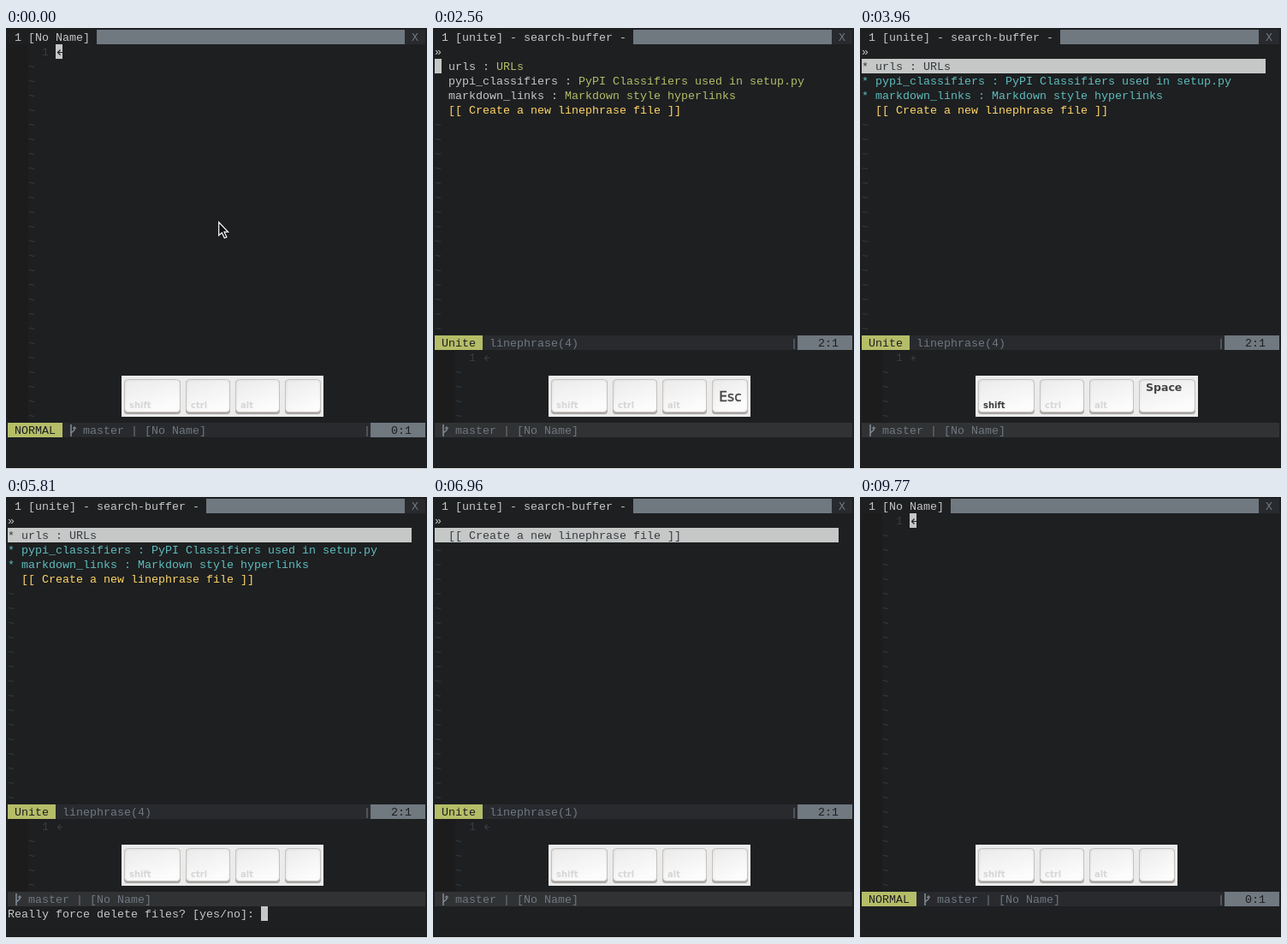
Recreate the animation shown at these times as an HTML page. Size 492 px wide and 515 px high, loop 9790 ms.

```html
<!DOCTYPE html>
<html lang="en">
<head>
<meta charset="utf-8">
<title>Editor session</title>
<style>
html, body { margin: 0; width: 100%; height: 100%; overflow: hidden; background: #1d1f21; }
svg { display: block; width: 492px; height: 515px; }
text { white-space: pre; }
.mono { font: 13.333px "Liberation Mono", monospace; }
.cap { font: bold 10px "DejaVu Sans", sans-serif; }
.key { font: bold 16px "DejaVu Sans", sans-serif; text-anchor: middle; }
.esc { font: 15.5px "DejaVu Sans", sans-serif; text-anchor: middle; stroke: #444; stroke-width: .35px; }
.wide { font: bold 12.5px "DejaVu Sans", sans-serif; }
</style>
</head>
<body>
<svg viewBox="0 0 492 515">
  <defs>
    <linearGradient id="face" x1="0" y1="0" x2="0.5" y2="1">
      <stop offset="0" stop-color="#e3e3e3"/>
      <stop offset="1" stop-color="#fbfbfb"/>
    </linearGradient>
  </defs>
  <g id="scene"></g>
</svg>
<script>
const LOOP = 9790, CW = 8, RH = 17;
const C = {
  bg: '#1d1f21', fg: '#c5c8c6', dim: '#373b41', gray: '#707880', bar: '#282a2e',
  green: '#b5bd68', blue: '#81a2be', cyan: '#5fbcbc', yellow: '#ffd566',
  sign: '#1c1c1c', idle: '#303234'
};
const ITEMS = [
  ['urls', 'URLs'],
  ['pypi_classifiers', 'PyPI Classifiers used in setup.py'],
  ['markdown_links', 'Markdown style hyperlinks']
];
const CREATE = '[[ Create a new linephrase file ]]';
const PROMPT = 'Really force delete files? [yes/no]: ';
const BLINK_OFF = [[90, 290], [690, 940], [1870, 2120], [5560, 5810]];
// Time and label of the last key pressed
const KEYS = [
  [0, ''], [1150, 'P'], [1660, ''], [2520, 'Esc'], [2980, 'V'], [3270, 'J'], [3920, 'Space'],
  [4480, ''], [4810, 'D'], [5360, ''], [5870, 'Y'], [5990, 'E'], [6130, 'S'],
  [6400, 'Enter'], [6960, ''], [8890, 'Q'], [9770, '']
];

const X = c => 2 + c * CW, Y = r => 2 + r * RH;
const within = (t, a, b) => t >= a && t < b;
const box = (x, y, w, h, f, extra = '') =>
  `<rect x="${x}" y="${y}" width="${w}" height="${h}" fill="${f}" ${extra}/>`;
const fill = (c, r, w, f, h = 1) => box(X(c), Y(r), w * CW, h * RH, f);
const text = (c, r, s, f) => `<text class="mono" x="${X(c)}" y="${Y(r) + 13}" fill="${f}">${s}</text>`;
const line = (d, f, w = 1) => `<path d="${d}" fill="none" stroke="${f}" stroke-width="${w}"/>`;
const tildes = (c, from, to) => {
  let s = '';
  for (let r = from; r <= to; r++) s += text(c, r, '~', C.dim);
  return s;
};

function eol(row, color, full) {
  const y = Y(row) + 9.5;
  return line(`M60.5 ${y}H66 M63.5 ${y - 3}L60.5 ${y}L63.5 ${y + 3}`, color, 1.2) +
    (full ? line(`M66 ${y}H67.5V${y - 4.5}`, color, 1.2) : '');
}

function branch(c, row) {
  const x = X(c), y = Y(row);
  return line(`M${x + 2} ${y + 2}V${y + 16} M${x + 2} ${y + 12}L${x + 6} ${y + 8.5}V${y + 5}`, '#808a92', 1.6) +
    line(`M${x + 4} ${y + 7}L${x + 6} ${y + 4.5}L${x + 8} ${y + 7}`, '#808a92');
}

function tabline(title) {
  const end = title.length + 2;
  return text(1, 0, title, C.fg) + fill(end, 0, 58 - end, C.gray) +
    fill(58, 0, 3, C.bar) + text(59, 0, 'X', C.gray);
}

function status(row, mode, color, pos) {
  const w = mode.length + 2;
  return fill(0, row, 61, C.bar) + fill(0, row, w, color) + text(1, row, mode, C.bg) +
    text(52, row, '|', C.gray) + fill(53, row, 8, C.gray) + text(56, row, pos, C.bg);
}

// Empty buffer window starting at a row, down to row 26
function emptyBuffer(row) {
  return fill(0, row, 3, C.sign, 27 - row) + text(5, row, '1', C.dim) + tildes(3, row + 1, 26);
}

function plainScene(t, lit) {
  const bar = within(t, 1150, 1230);
  let s = tabline('1 [No Name]') + emptyBuffer(1);
  if (bar) s += eol(1, C.dim, true) + box(58, 19, 2, 17, '#e4e6e4');
  else if (lit) s += fill(7, 1, 1, C.fg) + eol(1, C.bg, false);
  else s += eol(1, C.dim, true);
  s += status(27, 'NORMAL', C.green, '0:1') + branch(9, 27) + text(11, 27, 'master | [No Name]', C.gray);
  if (t < 940) {
    s += '<path d="M248.7 226.8V242.2L252.3 239L255.3 245.3L257.9 244.2L255 238.2H259.6Z" fill="#111" stroke="#fff" stroke-width="1.2"/>';
  }
  return s;
}

function uniteScene(t, lit) {
  const insert = t < 2540, visual = within(t, 2980, 3940);
  const marked = t >= 3940, deleted = t >= 6560, asking = within(t, 4850, 6450);
  const cur = !visual ? 2 : t < 3290 ? 2 : t < 3480 ? 3 : 4;
  const selected = insert || marked;
  const items = deleted ? [] : ITEMS;
  let s = tabline('1 [unite] - search-buffer' + (insert ? '' : ' -')) + text(0, 1, '»', C.fg);

  if (visual) s += fill(0, 2, 59, C.dim, cur - 1);
  if (selected) s += fill(0, 2, 59, C.fg);
  else s += fill(0, cur, 1, C.fg);

  items.forEach(([name, note], i) => {
    const row = i + 2, on = selected && i === 0;
    const main = on ? C.dim : marked ? C.cyan : C.fg;
    const side = on || marked ? main : C.green;
    if (marked) s += text(0, row, '*', main);
    s += text(2, row, name + ' :', main) + text(name.length + 5, row, note, side);
  });
  const last = items.length + 2;
  s += text(2, last, CREATE, deleted ? C.dim : C.yellow) + tildes(0, last + 1, 20);
  if (insert && lit) s += box(18, 19, 2, 17, '#e4e6e4');

  s += status(21, 'Unite', insert ? C.blue : C.green, insert ? '1:3' : cur + ':1') +
    text(8, 21, `linephrase(${items.length + 1})`, C.gray);
  s += emptyBuffer(22) + eol(22, C.dim, false);
  s += fill(0, 27, 61, C.idle) + branch(1, 27) + text(3, 27, 'master | [No Name]', C.gray);

  if (asking) {
    const n = [5870, 5990, 6130].filter(k => t >= k).length;
    const full = PROMPT + 'yes'.slice(0, n);
    s += text(0, 28, full, C.fg);
    if (lit) s += fill(full.length, 28, 1, C.fg);
  }
  if (visual) s += text(50, 29, cur - 1, C.fg);
  if (t >= 8890) s += text(50, 29, 'q', C.fg);
  return s;
}

function keycap(x, w) {
  return box(x, 411, w, 40, '#a9a5a2', 'rx="4"') +
    box(x + .5, 410.5, w - 1, 38, 'url(#face)', 'rx="4" stroke="#c4c0bd"') +
    box(x + 3, 412.5, w - 6, 33, '#fff', 'rx="3" opacity=".25"');
}

function keyboard(t) {
  const label = KEYS.filter(k => t >= k[0]).pop()[1];
  const wide = label.length > 3, shift = within(t, 2980, 4480);
  let s = box(135, 406, wide ? 260 : 236, 48, '#ebebeb');
  [['shift', 138, 66], ['ctrl', 210, 52], ['alt', 268, 52]].forEach(([name, x, w]) => {
    const color = shift && name === 'shift' ? '#3c3c3c' : '#d6d6d6';
    s += keycap(x, w) + `<text class="cap" x="${x + 6}" y="444" fill="${color}">${name}</text>`;
  });
  s += keycap(326, wide ? 66 : 42);
  if (wide) s += `<text class="wide" x="334" y="424" fill="#444">${label}</text>`;
  else if (label) {
    s += `<text class="${label === 'Esc' ? 'esc' : 'key'}" x="347.5" y="436" fill="#444">${label}</text>`;
  }
  return s;
}

function draw(t) {
  const lit = !BLINK_OFF.some(([a, b]) => within(t, a, b));
  const scene = within(t, 1230, 9240) ? uniteScene : plainScene;
  return box(0, 0, 492, 515, C.bg) + scene(t, lit) + keyboard(t) + box(0, 514, 492, 1, '#e8e8e8');
}

const root = document.getElementById('scene');
let shown = '';
function tick() {
  const next = draw(performance.now() % LOOP);
  if (next !== shown) root.innerHTML = shown = next;
  requestAnimationFrame(tick);
}
tick();
</script>
</body>
</html>
```
